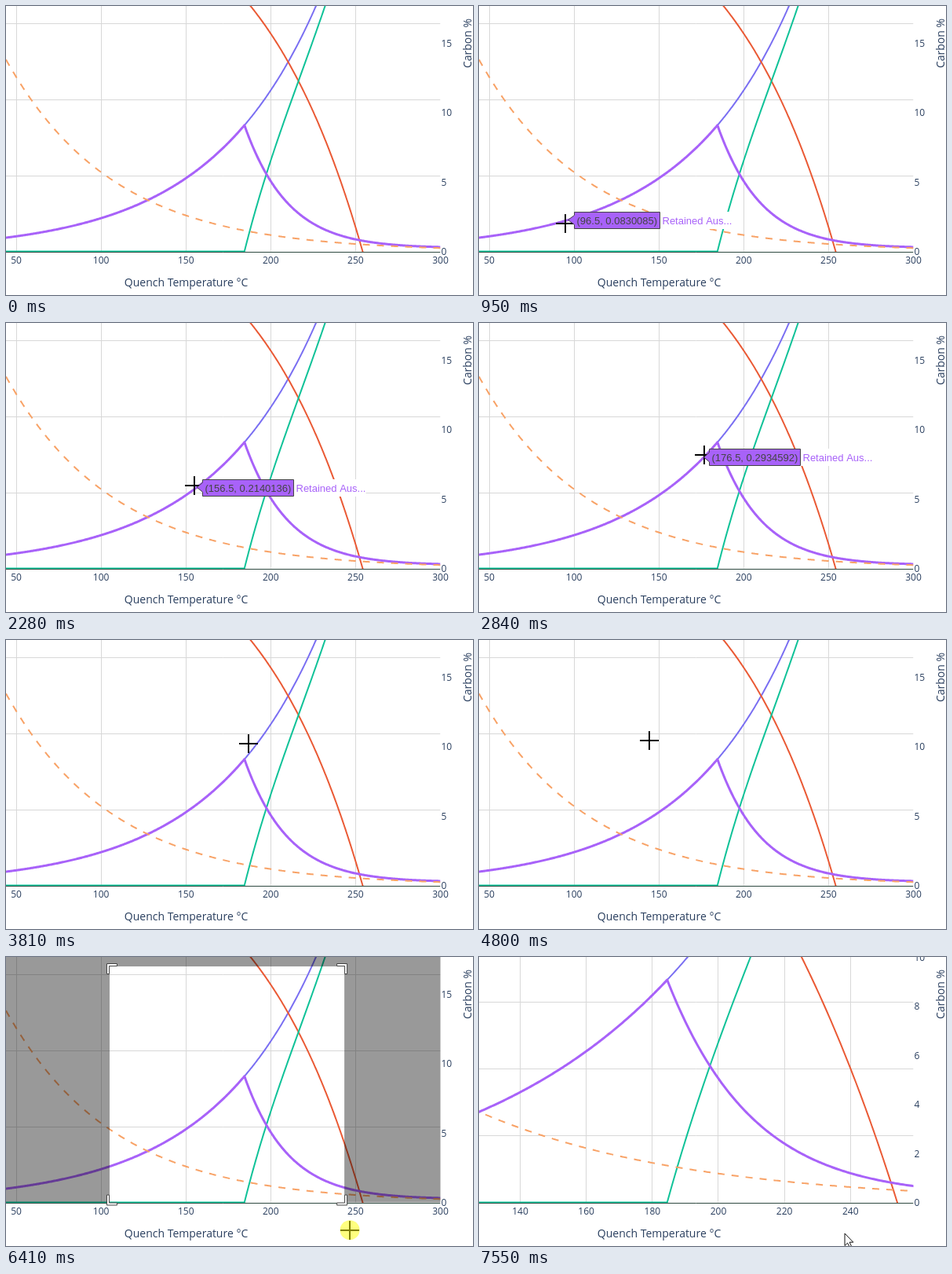
Recreate the animation shown at these times as an HTML page with a canvas. Size 595x368 px, loop 8000 ms.

```html
<!DOCTYPE html>
<html lang="en">
<head>
<meta charset="utf-8">
<title>Quench temperature chart</title>
<style>
html, body { margin: 0; width: 100%; height: 100%; overflow: hidden; background: #fff; }
canvas { display: block; }
</style>
</head>
<body>
<canvas id="stage" width="595" height="368"></canvas>
<script>
const ctx = document.getElementById('stage').getContext('2d');
const LOOP = 8000, RIGHT = 553.5, BASE = 312.5;
const APPEAR = 110, PRESS = 5780, RELEASE = 7480, ZOOM = 7550;
const PURPLE = '#a862f9', INK = '#2a3f5f';

// Pixel scales: kx per degree, ky per unit fraction, kc per carbon percent.
const wide = { t0: 50, x0: 13, kx: 2.162, ky: 482.5, kc: 17.7, xStep: 50, yStep: 0.2, cStep: 5 };
const close = { t0: 140, x0: 52.5, kx: 4.208, ky: 851, kc: 31.25, xStep: 20, yStep: 0.1, cStep: 2 };

// Phase fractions: exponential growth up to the peak, then a decay that levels off.
const PEAK = 184.5;
const RATE = Math.log(0.2934592 / 0.144231) / 45;
const austenite = T => 0.144231 * Math.exp(RATE * (T - 131.5));
function retained(T) {
  if (T <= PEAK) return austenite(T);
  const past = T - PEAK;
  return austenite(PEAK) * Math.exp(-0.0378 * past / (1 + (past / 173) ** 3));
}
const fresh = T => austenite(T) - retained(T);
const initial = T => 1 - austenite(T);
const carbon = T => 0.5 / austenite(T);

// Pointer path: time, x, y.
const path = [
  [APPEAR, 537, 356], [800, 95, 280], [950, 110, 277], [1720, 193, 245.5], [2840, 287, 168],
  [3050, 301, 157], [3250, 301, 157], [4050, 312, 122], [4800, 217, 128], [5750, 132, 12],
  [6060, 198, 106], [6340, 431, 346], [6600, 457, 352], [6890, 466, 352]
];
function pointerAt(t) {
  const next = path.findIndex(key => key[0] > t);
  const [t1, x1, y1] = path.at(next);
  const [t0, x0, y0] = path.at(next < 0 ? -2 : next - 1);
  const p = Math.min(1, (t - t0) / (t1 - t0));
  return { x: x0 + (x1 - x0) * p, y: y0 + (y1 - y0) * p };
}

const toX = (view, T) => view.x0 + (T - view.t0) * view.kx;
const toT = (view, x) => view.t0 + (x - view.x0) / view.kx;

function line(x1, y1, x2, y2, color, width) {
  ctx.strokeStyle = color;
  ctx.lineWidth = width;
  ctx.beginPath();
  ctx.moveTo(x1, y1);
  ctx.lineTo(x2, y2);
  ctx.stroke();
}

function curve(view, fn, scale, color, width, from = 40, to = 300, dash = []) {
  ctx.strokeStyle = color;
  ctx.lineWidth = width;
  ctx.lineJoin = 'round';
  ctx.setLineDash(dash);
  ctx.beginPath();
  for (let T = from; T <= to; T += 0.5) ctx.lineTo(toX(view, T), BASE - fn(T) * scale);
  ctx.stroke();
  ctx.setLineDash([]);
}

function text(str, x, y, size, align, color = INK, family = '"Open Sans", sans-serif') {
  ctx.font = `${size}px ${family}`;
  ctx.textAlign = align;
  ctx.fillStyle = color;
  ctx.fillText(str, x, y);
}

function drawPlot(view) {
  ctx.save();
  ctx.beginPath();
  ctx.rect(0, 0, RIGHT, 314);
  ctx.clip();
  const first = Math.ceil(toT(view, 0) / view.xStep) * view.xStep;
  for (let T = first; toX(view, T) < 550; T += view.xStep) {
    const x = Math.floor(toX(view, T)) + 0.5;
    line(x, 0, x, BASE, '#d8d8d8', 1);
  }
  for (let v = view.yStep; v * view.ky < BASE; v += view.yStep) {
    const y = Math.floor(BASE - v * view.ky) + 0.5;
    line(0, y, RIGHT, y, '#d8d8d8', 1);
  }
  curve(view, austenite, view.ky, '#7a6ff2', 2, PEAK);
  curve(view, initial, view.ky, '#ea5a35', 2, 180, 254.5);
  curve(view, fresh, view.ky, '#0fc298', 2);
  curve(view, retained, view.ky, PURPLE, 3);
  curve(view, carbon, view.kc, '#f8a266', 2, 40, 300, [9, 9]);
  line(0, 313.5, RIGHT, 313.5, '#2f4a40', 1);
  ctx.restore();
}

function drawLabels(view) {
  const first = Math.ceil(toT(view, 5) / view.xStep) * view.xStep;
  for (let T = first; toX(view, T) < 555; T += view.xStep) text(T, toX(view, T), 328, 12, 'center');
  for (let c = 0; c * view.kc < 320; c += view.cStep) text(c, 554.5, BASE - c * view.kc + 4.5, 12, 'left');
  text('Quench Temperature °C', 229.5, 357, 14, 'center');
  ctx.save();
  ctx.translate(593, 47.5);
  ctx.rotate(-Math.PI / 2);
  text('Carbon %', 0, 0, 14, 'center');
  ctx.restore();
}

function drawHover(view, pointer) {
  const nearest = Math.round((toT(view, pointer.x) - 1.5) / 5) * 5 + 1.5;
  const T = Math.min(nearest, PEAK);
  const x = toX(view, T), y = BASE - retained(T) * view.ky;
  if (Math.hypot(pointer.x - x, pointer.y - y) > 20) return;

  const label = `(${T}, ${+retained(T).toFixed(7)})`;
  const family = 'Arial, "Liberation Sans", sans-serif';
  ctx.font = `13px ${family}`;
  const left = Math.round(x + 7) + 0.5, top = Math.round(y - 10.5) + 0.5;
  const right = left + Math.round(ctx.measureText(label).width) + 6, bottom = top + 21;
  ctx.fillStyle = '#fff';
  ctx.fillRect(right, top - 0.5, 92, 22);
  ctx.beginPath();
  for (const [px, py] of [[x, y], [left, y - 6], [left, top], [right, top], [right, bottom], [left, bottom], [left, y + 6]]) {
    ctx.lineTo(px, py);
  }
  ctx.closePath();
  ctx.fillStyle = PURPLE;
  ctx.fill();
  ctx.strokeStyle = '#444';
  ctx.lineWidth = 1;
  ctx.stroke();
  text(label, left + 3, top + 15, 13, 'left', '#444', family);
  text('Retained Aus...', right + 3, top + 15, 13, 'left', PURPLE, family);
}

function drawSelection(t) {
  const fade = Math.min(1, Math.max(0, (t - 5920) / 280));
  const end = pointerAt(t - 70);
  const l = 132, top = 12, r = Math.max(l, end.x), b = Math.min(BASE, Math.max(top, end.y));
  ctx.fillStyle = `rgba(0,0,0,${0.4 * fade})`;
  ctx.beginPath();
  ctx.rect(0, 0, RIGHT, BASE);
  ctx.rect(l, top, r - l, b - top);
  ctx.fill('evenodd');

  const arm = Math.floor(Math.min(b - top, r - l, 20) / 2);
  ctx.save();
  ctx.globalAlpha = fade;
  ctx.fillStyle = '#fff';
  ctx.strokeStyle = '#444';
  ctx.lineWidth = 1;
  for (const [x, sx] of [[l, 1], [r, -1]]) {
    for (const [y, sy] of [[top, 1], [b, -1]]) {
      const corner = new Path2D(`M${x - 3.5 * sx},${y + (arm - 0.5) * sy}h${3 * sx}v${-arm * sy}` +
        `h${arm * sx}v${-3 * sy}h${-(arm + 3) * sx}Z`);
      ctx.fill(corner);
      ctx.stroke(corner);
    }
  }
  ctx.restore();
}

function drawArrow({ x, y }) {
  ctx.save();
  ctx.translate(x, y);
  const arrow = new Path2D('M0,0V15.5L3.6,12.2L6.2,17.6L8.6,16.5L6.1,11.2H10.8Z');
  ctx.fillStyle = '#fff';
  ctx.fill(arrow);
  ctx.strokeStyle = '#111';
  ctx.lineWidth = 1;
  ctx.stroke(arrow);
  ctx.restore();
}

function drawCross({ x, y }) {
  const cx = Math.round(x), cy = Math.round(y);
  line(cx - 12, cy, cx + 12, cy, '#000', 2);
  line(cx, cy - 12, cx, cy + 12, '#000', 2);
}

function draw(t) {
  const view = t < ZOOM ? wide : close;
  const dragging = t >= PRESS && t < RELEASE;
  ctx.fillStyle = '#fff';
  ctx.fillRect(0, 0, 595, 368);
  drawPlot(view);
  drawLabels(view);
  if (t < APPEAR) return;

  const pointer = pointerAt(t);
  if (dragging) drawSelection(t);
  if (dragging || pointer.y < BASE) drawCross(pointer);
  else drawArrow(pointer);
  if (dragging) {
    ctx.fillStyle = 'rgba(255,255,0,0.5)';
    ctx.beginPath();
    ctx.arc(pointer.x, pointer.y, 12.5, 0, Math.PI * 2);
    ctx.fill();
  } else if (t < PRESS) {
    drawHover(view, pointer);
  }
}

const start = performance.now();
function tick() {
  draw((performance.now() - start) % LOOP);
  requestAnimationFrame(tick);
}
tick();
</script>
</body>
</html>
```
